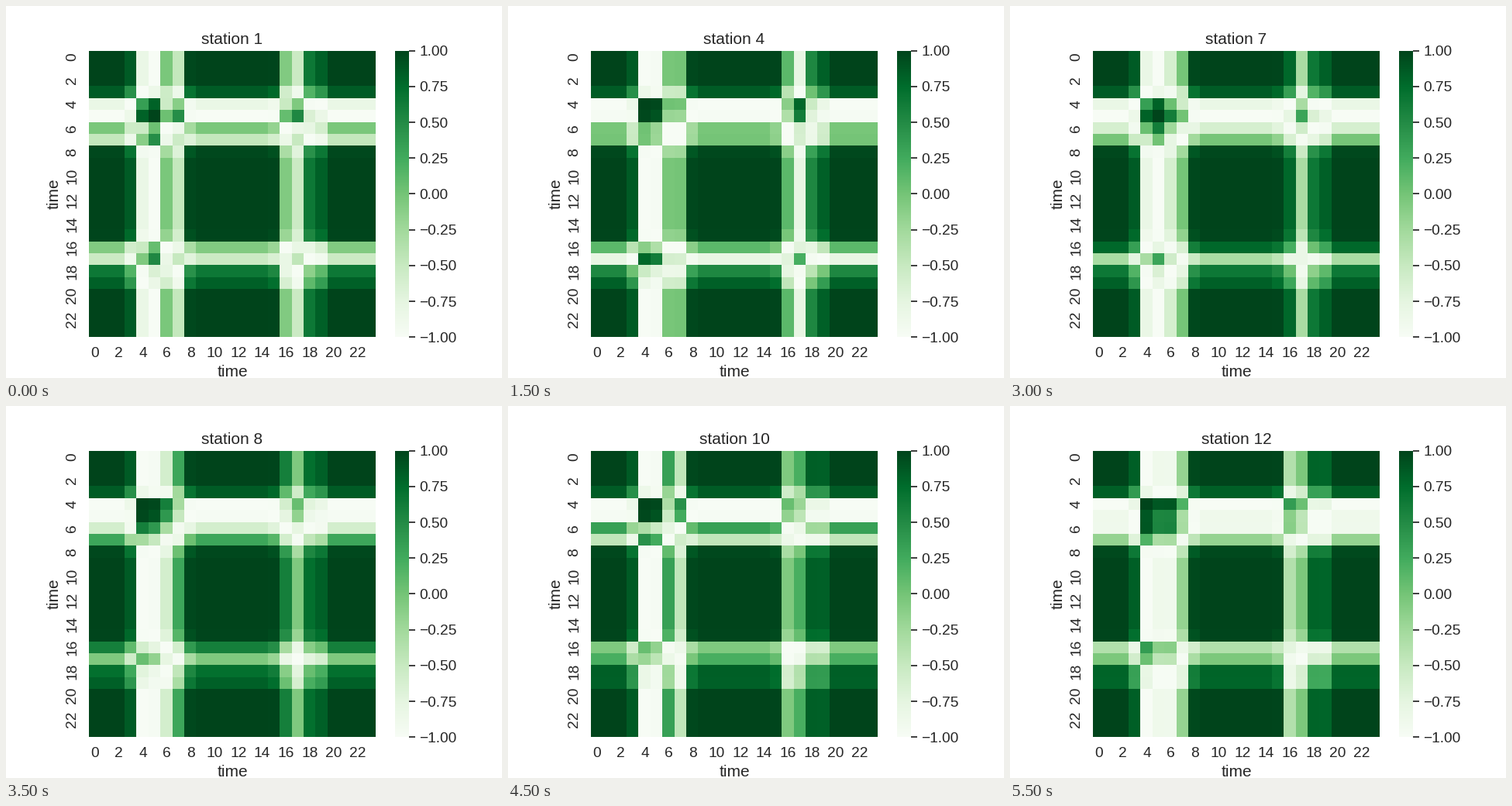
Animation, 640 px wide and 480 px high, one loop 6000 ms. Source, as a matplotlib script:

```python
import numpy as np
import matplotlib.pyplot as plt
from matplotlib.animation import FuncAnimation

INK = "#262626"
SCALE = 1.25
plt.rcParams.update({
    "font.family": "Liberation Sans",
    "text.color": INK,
    "axes.labelcolor": INK,
    "xtick.color": INK,
    "ytick.color": INK,
    "axes.titlesize": 12 * SCALE,
    "axes.labelsize": 12 * SCALE,
    "xtick.labelsize": 11 * SCALE,
    "ytick.labelsize": 11 * SCALE,
    "xtick.major.size": 6,
    "ytick.major.size": 6,
    "xtick.major.width": 1.25,
    "ytick.major.width": 1.25,
})

STATIONS = 12

# Typical level at the busy hours; every other hour rests at 1.
RUSH = {3: .86, 4: -.85, 5: -.8, 6: -.15, 7: -.1, 8: .97,
        15: .99, 16: .3, 17: -.25, 18: .7, 19: .83}

# How an hour's level varies from station to station: swing, period, peak.
WAVES = {4: (.2, 6, 0), 5: (.25, 3, 0), 6: (.5, 5, 5), 7: (.4, 5, 3),
         16: (.5, 9, 6.7), 17: (.5, 14, 10.5), 18: (.15, 14, 11)}


def daily_series(station):
    """24 hourly levels, scaled so that they span -1 to 1."""
    series = np.ones(24)
    series[list(RUSH)] = list(RUSH.values())
    for hour, (swing, period, peak) in WAVES.items():
        series[hour] += swing * np.cos(2 * np.pi * (station - peak) / period)
    return 1 - 2 * (1 - series) / (1 - series.min())


def angular_field(series):
    """Gramian angular summation field: cos(phi_i + phi_j)."""
    phi = np.arccos(np.clip(series, -1, 1))
    return np.cos(phi[:, None] + phi[None, :])


fields = [angular_field(daily_series(n + 1)) for n in range(STATIONS)]

fig, ax = plt.subplots(figsize=(6.4, 4.8), dpi=100)
# The slight shift makes inner cell edges snap down to whole pixels.
edges = np.append(np.arange(24) - 0.026, 24)
mesh = ax.pcolormesh(edges, edges, fields[0], cmap="Greens", vmin=-1, vmax=1)
ax.set(aspect="equal", xlim=(0, 24), ylim=(24, 0), xlabel="time", ylabel="time")
ax.spines[:].set_visible(False)
hours = np.arange(0, 24, 2)
ax.set_xticks(hours + 0.5, hours)
ax.set_yticks(hours + 0.5, hours, rotation=90, va="center")
ax.tick_params(left=False, bottom=False)

bar = fig.colorbar(mesh, ax=ax)
bar.outline.set_linewidth(0)
bar.set_ticks(np.linspace(-1, 1, 9))

title = ax.set_title("station 1")


def update(frame):
    mesh.set_array(fields[frame])
    title.set_text(f"station {frame + 1}")
    return mesh, title


anim = FuncAnimation(fig, update, frames=STATIONS, interval=500,
                     repeat=True, repeat_delay=0)
plt.show()
```
